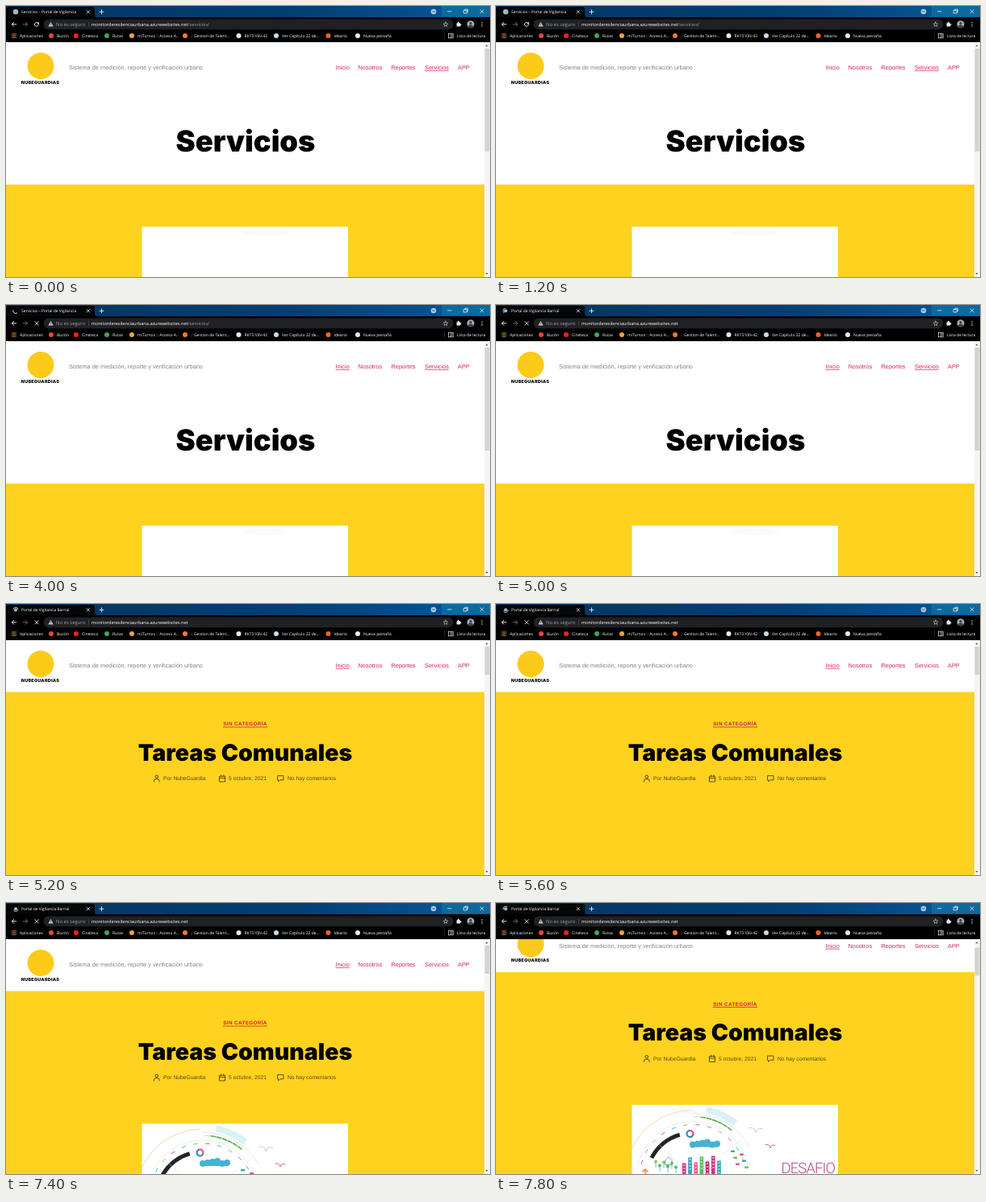
Animation, 600 px wide and 337 px high, one loop 8 s. Source, as an HTML page:

```html
<!DOCTYPE html>
<html lang="es">
<head>
<meta charset="utf-8">
<title>Servicios</title>
<style>
html, body { margin: 0; width: 100%; height: 100%; overflow: hidden; background: #fff; }
svg { display: block; width: 600px; height: 337px; }
text { text-rendering: geometricPrecision; white-space: pre; }
.ui { font-family: "Open Sans", sans-serif; }
.body { font-family: "Liberation Sans", Arial, sans-serif; }
.head { font-family: Inter, sans-serif; font-weight: 900; }
.thin { font-family: Roboto, sans-serif; font-weight: 300; }
.line { fill: none; stroke-linecap: round; stroke-linejoin: round; }
</style>
</head>
<body>
<svg id="stage" viewBox="0 0 600 337" xmlns="http://www.w3.org/2000/svg">
  <defs>
    <linearGradient id="bar">
      <stop offset="0" stop-color="#03355f"/>
      <stop offset=".6" stop-color="#023f75"/>
      <stop offset="1" stop-color="#07599b"/>
    </linearGradient>
    <linearGradient id="fade">
      <stop offset="0" stop-color="#050607" stop-opacity="0"/>
      <stop offset="1" stop-color="#050607"/>
    </linearGradient>
    <clipPath id="view"><rect y="45" width="593" height="292"/></clipPath>
    <clipPath id="card"><rect x="168.5" y="274.5" width="255.5" height="140"/></clipPath>
  </defs>
  <rect width="600" height="337" fill="#fff"/>
  <g clip-path="url(#view)">
    <g id="page">
      <g id="services"></g>
      <g id="home"></g>
      <g id="header"></g>
    </g>
  </g>
  <g id="scrollbar"></g>
  <g id="chrome"></g>
</svg>
<script>
const LOOP = 8000, STEP = 200, SCROLL = 23.5;
const YELLOW = '#ffd21f', PINK = '#dc2459';
const $ = id => document.getElementById(id);

function add(parent, tag, attrs, content) {
  const el = document.createElementNS('http://www.w3.org/2000/svg', tag);
  for (const k in attrs) el.setAttribute(k, attrs[k]);
  if (content) el.textContent = content;
  return parent.appendChild(el);
}
const rect = (p, x, y, width, height, fill, more) => add(p, 'rect', { x, y, width, height, fill, ...more });
const dot = (p, cx, cy, r, fill) => add(p, 'circle', { cx, cy, r, fill });
const line = (p, d, stroke, width = .8, more) =>
  add(p, 'path', { d, class: 'line', stroke, 'stroke-width': width, ...more });
const text = (p, cls, x, y, size, str, fill, more) =>
  add(p, 'text', { class: cls, x, y, 'font-size': size, fill, ...more }, str);
const show = (el, on) => { el.style.display = on ? '' : 'none'; };
const MID = { 'text-anchor': 'middle' };
const BUTT = { style: 'stroke-linecap:butt' };

function arc(cx, cy, r, from, to) {
  const at = a => {
    const t = a * Math.PI / 180;
    return `${(cx + r * Math.cos(t)).toFixed(2)} ${(cy + r * Math.sin(t)).toFixed(2)}`;
  };
  return `M${at(from)}A${r} ${r} 0 ${to - from > 180 ? 1 : 0} 1 ${at(to)}`;
}

function buildHeader() {
  const g = $('header');
  dot(g, 43, 74.5, 16.5, '#fccb1a');
  text(g, 'head', 42.5, 96.6, 5.5, 'NUBEGUARDIAS', '#111', { ...MID, 'letter-spacing': .22 });
  text(g, 'body', 78, 79.3, 7.4, 'Sistema de medición, reporte y verificación urbano', '#838383');
  const nav = [[408.5, 'Inicio'], [436.5, 'Nosotros'], [477.5, 'Reportes'], [519, 'Servicios'], [560, 'APP']];
  for (const [x, label] of nav) text(g, 'body', x, 79.3, 7.4, label, PINK);
  return {
    inicio: rect(g, 408.5, 80.3, 17.5, .7, PINK),
    servicios: rect(g, 519, 80.3, 29.8, .7, PINK)
  };
}

function buildServices() {
  const g = $('services');
  rect(g, 0, 222, 593, 115, YELLOW);
  rect(g, 168.5, 274.5, 255.5, 63, '#fff');
  add(g, 'ellipse', { cx: 321, cy: 282, rx: 30, ry: 4, fill: '#fafafb' });
  text(g, 'head', 297, 181, 36.3, 'Servicios', '#000', MID);
}

function bird(p, x, y, s, color) {
  line(p, 'M-6-2Q-1-3 0 2Q2-3 6-1', color, .8, { transform: `translate(${x} ${y}) scale(${s})` });
}

function buildPicture(home) {
  const g = add(home, 'g', { 'clip-path': 'url(#card)' });
  const cx = 244, cy = 365;
  rect(g, 168, 274, 257, 141, '#fff');
  line(g, arc(cx, cy, 84, 185, 268), '#f3b57c', .6);
  line(g, arc(cx, cy, 80, 270, 330), '#c9cdd0', .5);
  line(g, arc(cx, cy, 70, 190, 350), '#d5dadd', .5);
  line(g, arc(cx + 1, cy + 3, 59, 208, 253), '#222629', 5, BUTT);
  line(g, arc(cx, cy, 86, 281, 308), '#d9f1f7', 8, BUTT);
  line(g, arc(cx, cy, 76, 272, 304), '#8fcf72', .6);
  line(g, arc(cx, cy, 76, 278, 310), '#58b548', 1.7, { 'stroke-dasharray': '5 2.2' });
  for (let a = 195; a < 350; a += 13)
    line(g, arc(cx, cy, 66, a, a + 4), ['#e0488c', '#41b8c4', '#8fc756'][a % 3], 1);
  line(g, `M${cx} ${cy}L196 318M${cx} ${cy}L304 318`, '#d7dde0', .5);

  line(g, arc(240.5, 310.5, 4, 20, 250), '#2687b8', 2);
  line(g, arc(240.5, 310.5, 4, 260, 370), '#e3478f', 2);

  // trees and skyline
  for (let i = 0; i < 6; i++) dot(g, 244 + i * 6, 324 - (i * 5) % 4, 4, '#45b2d4');
  rect(g, 242, 323.5, 34, 3.5, '#45b2d4', { rx: 1.7 });
  const colors = ['#d63384', '#2aa7b8', '#e85b9d', '#67b657', '#b52a76'];
  for (let i = 0; i < 7; i++) {
    const h = 15 + (i * 7) % 13, x = 231 + i * 7.2, w = 4.6;
    rect(g, x, 362 - h, w, h, colors[i % 5]);
    for (let j = 0; j < 4; j++) rect(g, x + 1.1, 364 - h + j * 4, 2.4, 1, '#fff');
  }
  for (let i = 0; i < 6; i++) {
    const x = 198 + i * 5, y = 346 + (i * 5) % 9;
    line(g, `M${x} ${y + 6}V${y}`, '#38a68a', .7);
    dot(g, x, y - 1, 2, i % 2 ? '#48b783' : '#8ac653');
  }
  for (let i = 0; i < 6; i++) {
    const x = 291 + (i * 11) % 19, y = 331 + i * 4;
    rect(g, x, y, 5, 2.4, ['#34a6bd', '#e2528f', '#75be54'][i % 3], { rx: 1 });
  }
  line(g, 'M210 343l4-4 4 4v6h-8z', '#35aa83', .8);
  line(g, 'M185 364v-9M182 357.5l3-3 3 3', '#ef8b3a', 1.6);
  bird(g, 322, 306, 1.4, '#e2cbd2');
  bird(g, 340, 326, 1, '#d23a67');
  text(g, 'thin', 353.5, 359.5, 18.5, 'DESAFIO', '#b14a8d', { 'letter-spacing': -.9 });
  return g;
}

function buildHome() {
  const g = $('home');
  rect(g, 0, 109.5, 593, 300, YELLOW);
  text(g, 'body', 296.5, 151.2, 6.3, 'SIN CATEGORÍA', '#cf2038',
    { ...MID, 'font-weight': 700, 'letter-spacing': .38 });
  rect(g, 269, 152.6, 55, .8, '#cf2038');
  text(g, 'head', 296.5, 194.5, 28.5, 'Tareas Comunales', '#000', MID);

  const ink = '#4d4010';
  line(g, 'M183.5 221v-1.2q0-2 2-2h2.6q2 0 2 2v1.2', ink, .9);
  dot(g, 186.8, 214.8, 1.8, 'none').setAttribute('stroke', ink);
  line(g, 'M264.8 214.2h6.8v6.8h-6.8zM264.8 216.6h6.8M266.6 212.8v2M269.8 212.8v2', ink, .9);
  line(g, 'M337 213.6h7v5.2h-4.2l-2.2 2.2v-2.2h-.6z', ink, .9);
  text(g, 'body', 195, 219.4, 6.75, 'Por NubeGuardia', '#57480f');
  text(g, 'body', 276, 219.4, 6.75, '5 octubre, 2021', '#57480f');
  text(g, 'body', 349, 219.4, 6.75, 'No hay comentarios', '#57480f');
  return buildPicture(g);
}

function buildScrollbar() {
  const g = $('scrollbar');
  rect(g, 593, 45, 7, 292, '#f5f5f5');
  add(g, 'path', { d: 'M594.4 50.2h3.2l-1.6-1.9zM594.4 332h3.2l-1.6 1.9z', fill: '#555' });
  return rect(g, 593.5, 53, 6, 128, '#d4d4d4');
}

function buildChrome() {
  const g = $('chrome');
  rect(g, 0, 0, 600, 45, '#000');
  rect(g, 0, 0, 600, 14, 'url(#bar)');
  rect(g, 540, 0, 60, 13, '#0c6a9f');
  add(g, 'path', { d: 'M0 14V3q0-2 2-2H107q3 0 3 3v7q0 3 3 3z', fill: '#050607' });

  const title = text(g, 'ui', 19, 9.2, 4.9, ' ', '#fff');
  rect(g, 89, 2, 8, 11, 'url(#fade)');
  rect(g, 97, 2, 9, 11, '#050607');
  line(g, 'M100.2 5.6l3.4 3.4M103.6 5.6l-3.4 3.4', '#fff');
  line(g, 'M116 7.3h5M118.5 4.8v5', '#fff');
  const favicon = dot(g, 12, 7.3, 3.3, '#9fb6c2');
  const spin = line(g, arc(0, 0, 3.2, 10, 140), '#e4e8ec', .9);

  dot(g, 530, 7, 3.3, '#a8cbe6');
  line(g, 'M528.9 6.5l1.1 1.2 1.1-1.2', '#12395c', .9);
  line(g, 'M547.5 6.8h4.6M567.6 5.4h3.6v3.6h-3.6zM568.8 5.2V4.2h3.6v3.6h-1M587.9 4.7l4.2 4.2M592.1 4.7l-4.2 4.2', '#fff', .7);

  // toolbar
  line(g, 'M12.8 22.8H7.4M9.8 20.3l-2.5 2.5 2.5 2.5', '#fff', .9);
  line(g, 'M21.2 22.8h5.4M24.2 20.3l2.5 2.5-2.5 2.5', '#777', .9);
  const reload = add(g, 'g');
  line(reload, arc(38, 22.8, 2.5, 10, 310), '#fff', .9);
  add(reload, 'path', { d: 'M40.8 19.8v2.6h-2.6z', fill: '#fff' });
  const stop = line(g, 'M35.8 20.6l4.4 4.4M40.2 20.6l-4.4 4.4', '#fff', .9);

  rect(g, 46.5, 16.5, 508, 12.7, '#202124', { rx: 6.3 });
  add(g, 'path', { d: 'M55.5 19.8l3.2 5.6h-6.4z', fill: '#bfc3c7' });
  rect(g, 55.2, 21.6, .6, 2, '#202124');
  text(g, 'ui', 62, 24.9, 5.95, 'No es seguro', '#9aa0a6');
  rect(g, 102, 19.8, .5, 6.2, '#5f6368');
  const url = text(g, 'ui', 106, 24.9, 5.6, '', '#fff');
  add(url, 'tspan', {}, 'monitorderesilenciaurbana.azurewebsites.net');
  const path = add(url, 'tspan', { fill: '#9aa0a6' }, '/servicios/');

  line(g, 'M545 20l.8 1.9 2 .2-1.5 1.3.5 2-1.8-1.1-1.8 1.1.5-2-1.5-1.3 2-.2z', '#d5d8db', .6);
  rect(g, 558.6, 21.2, 4.6, 4.2, '#e8eaed', { rx: .6 });
  dot(g, 560.8, 20.9, 1.1, '#e8eaed');
  dot(g, 563.4, 23.3, 1.1, '#e8eaed');
  dot(g, 576, 22.8, 4.5, '#a9afb5');
  add(g, 'path', { d: 'M572.8 25.9q.4-2.7 3.2-2.7t3.2 2.7q-3.2 2.8-6.4 0z', fill: '#3c4247' });
  dot(g, 576, 21.4, 1.6, '#3c4247');
  for (const y of [20.6, 22.8, 25]) dot(g, 590, y, .65, '#fff');

  // bookmarks
  const tints = ['#e8503f', '#f2b928', '#45a35b'];
  for (let i = 0; i < 9; i++)
    rect(g, 7 + i % 3 * 2.2, 34.2 + (i / 3 | 0) * 2.2, 1.4, 1.4, tints[i % 3]);
  const marks = [
    [17, 'Aplicaciones'],
    [63, 'Buzón', '#e5473c'],
    [94, 'Cineteca', '#f0201c'],
    [132, 'Rutas', '#3fa757'],
    [163, 'miTurnos :: Acceso A...', '#f0a13c'],
    [229, '.: Gestion de Talent...', '#ee7c2b'],
    [295.5, 'RK7310N-42', '#e9ebee'],
    [342, 'Ver Capítulo 22 de...', '#c4dcee'],
    [406.5, 'Ideario', '#ed642a'],
    [443, 'Nueva pestaña', '#e9ebee']
  ];
  for (const [x, label, color] of marks) {
    if (color) dot(g, x - 7, 37, 3, color);
    text(g, 'ui', x, 38.9, 5, label, '#fff');
  }
  rect(g, 543.5, 33, .5, 8, '#444');
  rect(g, 548.6, 34.2, 5.6, 5.6, 'none', { stroke: '#eee', 'stroke-width': .7 });
  line(g, 'M551.4 34.4v5.2M552.4 36h1M552.4 37.8h1', '#eee', .6);
  text(g, 'ui', 559, 38.9, 5, 'Lista de lectura', '#fff');
  return { title, favicon, spin, reload, stop, path };
}

const under = buildHeader();
buildServices();
const picture = buildHome();
const thumb = buildScrollbar();
const ui = buildChrome();

// moments when the state changes, ms
const AT = { hover: 1600, load: 2000, commit: 4800, home: 5200, picture: 6000, scroll: 7800 };

function draw(t) {
  const on = name => t >= AT[name];
  const loading = on('load'), commit = on('commit'), home = on('home'), scrolled = on('scroll');

  show($('services'), !home);
  show($('home'), home);
  show(under.inicio, on('hover'));
  show(under.servicios, !home);
  show(picture, on('picture'));
  $('page').setAttribute('transform', `translate(0 ${scrolled ? -SCROLL : 0})`);
  thumb.setAttribute('height', home ? 35 : 128);
  thumb.setAttribute('y', scrolled ? 55.5 : 53);

  ui.title.textContent = commit ? 'Portal de Vigilancia Barrial' : 'Servicios – Portal de Vigilancia';
  show(ui.path, !commit);
  show(ui.reload, !loading);
  show(ui.stop, loading);
  show(ui.favicon, !loading || commit);
  ui.favicon.setAttribute('r', commit ? 2.1 : 3.3);
  show(ui.spin, loading);
  const step = Math.floor((t - AT.load) / STEP);
  const turn = commit ? step * 80 : 40 - (step - 5) * 70;
  ui.spin.setAttribute('transform', `translate(12 7.3) rotate(${turn})`);
  ui.spin.setAttribute('stroke', commit ? '#a9d4ec' : '#e4e8ec');
}

function tick() {
  draw(performance.now() % LOOP);
  requestAnimationFrame(tick);
}
tick();
</script>
</body>
</html>
```
